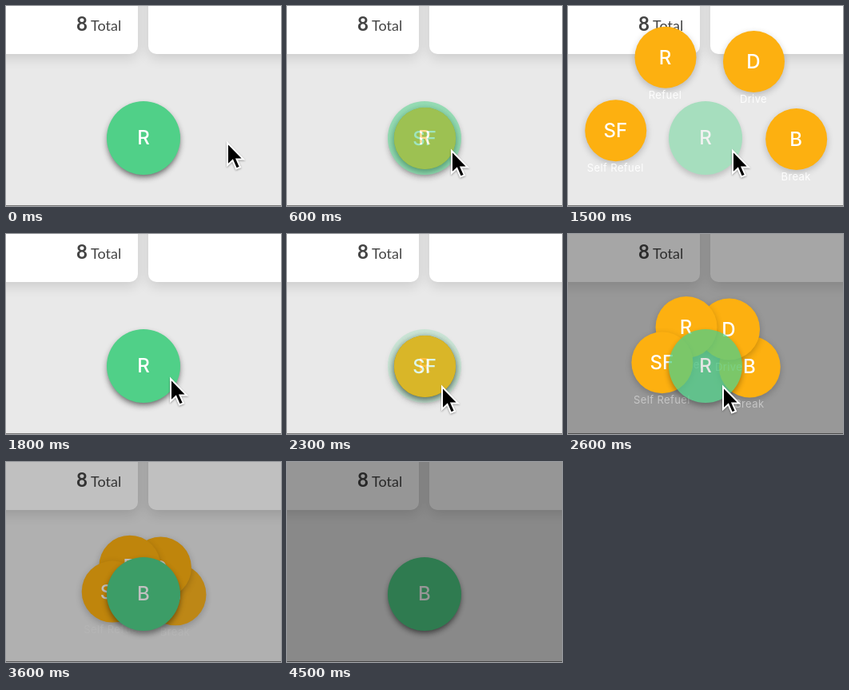
An HTML page for the animation above (5400 ms loop, 344 by 250 pixels).

```html
<!DOCTYPE html>
<html lang="en">
<head>
<meta charset="utf-8">
<title>Radial action menu</title>
<style>
html, body { margin: 0; width: 100%; height: 100%; overflow: hidden; background: #e9e9e9; }
#stage { position: relative; width: 344px; height: 250px; overflow: hidden; background: #e9e9e9; }
#stage div, #cursor { position: absolute; }
.card { top: -40px; height: 100px; border-radius: 10px; background: #fff; box-shadow: 0 5px 16px rgba(0, 0, 0, .13); }
.total { font-family: Lato, sans-serif; color: #444; line-height: 30px; white-space: nowrap; }
.line { left: 0; top: 249px; width: 344px; height: 1px; background: #777; }
.shade { inset: 0; background: #000; }
.disc {
  border-radius: 50%; color: #fff; text-align: center;
  font: 500 24px Inter, sans-serif;
}
.item { width: 77px; height: 77px; left: -38.5px; top: -38.5px; line-height: 77px; background: #fdb010; box-shadow: 0 3px 8px rgba(0, 0, 0, .22); }
.label {
  width: 100px; left: -50px; top: 39px; line-height: 16px; text-align: center; color: #fff;
  font-family: Inter, sans-serif; font-size: 13px; letter-spacing: .4px;
}
#main { width: 92px; height: 92px; left: 126px; top: 119px; line-height: 92px; background: #50d088; box-shadow: 0 4px 7px rgba(0, 0, 0, .42); }
#cursor { left: 0; top: 0; overflow: visible; filter: drop-shadow(0 1px 1px rgba(0, 0, 0, .35)); }
</style>
</head>
<body>
<div id="stage">
  <div class="card" style="left:-40px;width:205px"></div>
  <div class="card" style="left:178px;width:210px"></div>
  <div class="total" style="left:88px;top:7px;font-size:24px;font-weight:700">8</div>
  <div class="total" style="left:106px;top:9px;font-size:18px">Total</div>
  <div class="line"></div>
  <div class="shade" id="backdrop"></div>
  <div id="items"></div>
  <div class="disc" id="main">R</div>
  <div class="shade" id="dim"></div>
  <svg id="cursor" width="24" height="38">
    <path d="M1 1V29L7.5 23 12 33.5 17 31.5 12.5 21.5H21Z" stroke="#fff" stroke-width="2"/>
  </svg>
</div>
<script>
const LOOP = 5400, STEP = 100, LAST_CHANGE = 4500;
const CENTER = { x: 172, y: 165 }, REACH = 123;
const MOVE = 300, PRESS = 150, RELEASE = 250;
const CURSOR_GONE = 3600, SELECTED = 3450;

const openings = [[669, 1450], [2460, 3415]];           // menu open, close
const mainPresses = [[520, 650], [1200, 1405], [2130, 2450]]; // down, up
const breakPresses = [[3230, 3400]];
const cursorPath = [
  [0, 276, 170], [150, 286, 175], [500, 205, 180], [1950, 205, 180],
  [2200, 193, 190], [2650, 193, 190], [3200, 287, 177]
];

const $ = id => document.getElementById(id);
const clamp = v => Math.min(1, Math.max(0, v));
const ramp = (t, start, length, power) => {
  const p = clamp((t - start) / length);
  return p < .5 ? (2 * p) ** power / 2 : 1 - (2 - 2 * p) ** power / 2;
};
const pulse = (t, spans, rise, fall, power) =>
  Math.max(...spans.map(([a, b]) => ramp(t, a, rise, power) - ramp(t, b, fall, power)));
const pressOpacity = (t, presses) => 1 - .8 * pulse(t, presses, PRESS, RELEASE, 2);

// Stacked from back to front; order counts clockwise from the left.
const items = [["B", "Break", 3], ["D", "Drive", 2], ["R", "Refuel", 1], ["SF", "Self Refuel", 0]]
  .map(([letters, name, order]) => {
    const root = document.createElement("div");
    root.innerHTML = `<div class="disc item">${letters}</div><div class="label">${name}</div>`;
    $("items").append(root);
    const angle = (-175 + 58.5 * order) * Math.PI / 180;
    return { root, disc: root.firstChild, label: root.lastChild, dx: Math.cos(angle), dy: Math.sin(angle) };
  });

function cursorAt(t) {
  const next = cursorPath.findIndex(k => k[0] > t);
  if (next < 0) return cursorPath.at(-1).slice(1);
  const [t0, x0, y0] = cursorPath[next - 1], [t1, x1, y1] = cursorPath[next];
  const p = ramp(t, t0, t1 - t0, 1.4);
  return [x0 + (x1 - x0) * p, y0 + (y1 - y0) * p];
}

function draw(t) {
  const spread = pulse(t, openings, MOVE, MOVE, 1.67);
  const isOpen = openings.some(([a, b]) => t >= a && t < b);
  for (const { root, label, dx, dy } of items) {
    const x = CENTER.x + dx * REACH * spread, y = CENTER.y + dy * REACH * spread;
    root.style.transform = `translate(${x}px, ${y}px)`;
    label.style.opacity = spread;
  }
  items[0].disc.style.opacity = pressOpacity(t, breakPresses);
  $("main").style.opacity = pressOpacity(t, mainPresses);
  $("main").textContent = t < SELECTED ? "R" : "B";
  $("backdrop").style.opacity = isOpen ? .35 : 0;
  $("dim").style.opacity = .41 * ramp(t, 3450, 250, 1);

  const [x, y] = cursorAt(t);
  $("cursor").style.transform = `translate(${x}px, ${y}px)`;
  $("cursor").style.display = t < CURSOR_GONE ? "" : "none";
}

function tick() {
  const t = performance.now() % LOOP;
  draw(Math.min(LAST_CHANGE, Math.floor(t / STEP) * STEP));
  requestAnimationFrame(tick);
}
tick();
</script>
</body>
</html>
```
